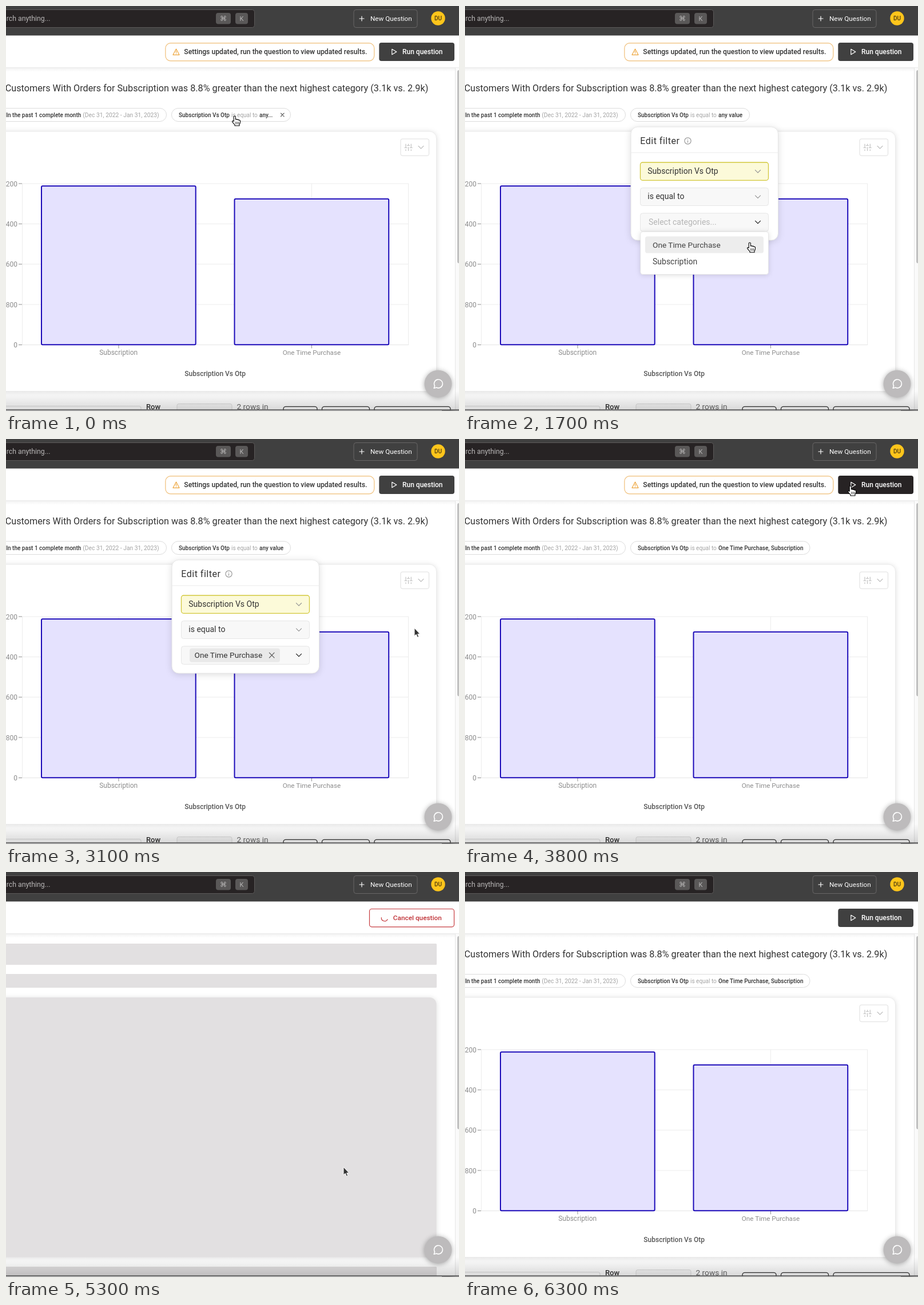
These frames come from a looping animation (792x707 px, 6.79 s). An HTML page:

```html
<!DOCTYPE html>
<html lang="en">
<head>
<meta charset="utf-8">
<title>Edit filter</title>
<style>
html, body { margin: 0; width: 100%; height: 100%; overflow: hidden; background: #fff; }
svg { display: block; width: 792px; height: 707px; font: 12px Roboto, "Open Sans", sans-serif; fill: #333; }
text { white-space: pre; }
.m { font-weight: 500; }
.mid { text-anchor: middle; }
.end { text-anchor: end; }
.dim { fill: #a3a3a3; }
.axis { fill: #8c8c8c; }
.white { fill: #fff; }
.line { fill: none; stroke-width: 1.2; stroke-linecap: round; stroke-linejoin: round; }
.pill { fill: #fff; stroke: #dcdcdc; }
.field { fill: #f8f8f8; stroke: #e6e6e6; }
.bar { fill: #e5e2fe; stroke: #1c0bb9; stroke-width: 2; }
.skeleton { fill: #e2e0e1; }
.shadow { filter: drop-shadow(0 1px 4px #0002); }
.s10 { font-size: 10px; }
.s14 { font-size: 14px; }
.s137 { font-size: 13.7px; }
</style>
</head>
<body>
<svg viewBox="0 0 792 707">
  <defs>
    <linearGradient id="fade" x2="0" y2="1">
      <stop offset="0" stop-color="#000" stop-opacity="0"/>
      <stop offset="1" stop-color="#000" stop-opacity=".15"/>
    </linearGradient>
    <linearGradient id="under" x2="0" y2="1">
      <stop offset="0" stop-color="#f3f3f3"/>
      <stop offset="1" stop-color="#fff"/>
    </linearGradient>
    <path id="chevron" class="line" d="M-4.5 -2.2L0 2.3L4.5 -2.2"/>
    <path id="cross" class="line" d="M-1 -1L1 1M1 -1L-1 1" vector-effect="non-scaling-stroke"/>
  </defs>
  <rect width="792" height="707" fill="#fff"/>
  <rect y="108" width="785" height="7" fill="url(#under)"/>

  <!-- header -->
  <rect width="792" height="51.5" fill="#404040"/>
  <rect x="-20" y="6.5" width="454.5" height="31" rx="4" fill="#272324" stroke="#5c5a5a"/>
  <text x="77.5" y="26" class="end" font-size="12.3" fill="#b9b7b7">Search anything...</text>
  <rect x="367" y="12" width="26" height="19.5" rx="4" fill="#5a5858"/>
  <rect x="401" y="12" width="22" height="19.5" rx="4" fill="#5a5858"/>
  <text x="380" y="26" class="mid" fill="#b9b7b7" style="font-family:Roboto,'DejaVu Sans',sans-serif">⌘</text>
  <text x="412" y="25.5" class="mid" font-size="11" fill="#b9b7b7">K</text>
  <rect x="608" y="6.5" width="111" height="31" rx="4" fill="none" stroke="#686666"/>
  <path class="line" stroke="#fff" d="M618 22H626M622 18V26"/>
  <text x="637" y="26" font-size="11.7" class="white">New Question</text>
  <circle cx="755.5" cy="21.5" r="12.2" fill="#fec51b"/>
  <text x="755.5" y="25" class="mid s10 m" fill="#4c3b10">DU</text>

  <!-- toolbar -->
  <path d="M0 107.8H792" stroke="#e3e3e3"/>
  <g id="notice">
    <rect x="278.8" y="64.8" width="365" height="31" rx="9" fill="#fff" stroke="#f2c88c" stroke-width="1.4"/>
    <path class="line" stroke="#eda63f" d="M297.5 75L303 85.3H292ZM297.5 78.8V81.6M297.5 83.4V83.5"/>
    <text x="311.3" y="84.3" font-size="12.2" class="m">Settings updated, run the question to view updated results.</text>
  </g>
  <g id="run">
    <rect id="runBox" x="652.3" y="64" width="131.7" height="32" rx="4"/>
    <path class="line" stroke="#fff" d="M674.8 75.3L682.8 80L674.8 84.8Z"/>
    <text x="693" y="84.3" class="white m">Run question</text>
  </g>
  <g id="cancel">
    <rect x="635.5" y="64.5" width="148" height="31.3" rx="4" fill="#fff" stroke="#c63b3f" stroke-width="1.2"/>
    <path id="spinner" class="line" stroke="#c63b3f" d="M656.3 79.5A5.7 5.7 0 0 0 667 82.7"/>
    <text x="676.8" y="84.3" class="m" font-size="11.8" fill="#bf3035">Cancel question</text>
  </g>

  <!-- results -->
  <g id="results">
    <text x="738.3" y="149.3" class="end" font-size="16.2">Customers With Orders for Subscription was 8.8% greater than the next highest category (3.1k vs. 2.9k)</text>
    <rect class="pill" x="-30" y="178.5" width="310.5" height="23" rx="11.5"/>
    <text x="131.3" y="193.7" class="end s10 m">In the past 1 complete month</text>
    <text x="134.3" y="193.7" class="dim" font-size="10.3">(Dec 31, 2022 - Jan 31, 2023)</text>
    <rect id="pill" class="pill" x="289.5" y="178.5" height="23" rx="11.5"/>
    <text x="302" y="193.7" class="s10 m">Subscription Vs Otp</text>
    <text x="394" y="193.7" class="s10 dim">is equal to</text>
    <text id="pillValue" x="443" y="193.7" class="s10 m"></text>
    <use id="pillCross" href="#cross" transform="translate(483.3 190) scale(2.8)" stroke="#555"/>

    <rect class="shadow" x="-30" y="219" width="782.5" height="453.5" rx="12" fill="#fff" stroke="#ebebeb"/>
    <rect x="690" y="232" width="49.5" height="29.3" rx="3" fill="#fff" stroke="#dedede"/>
    <path class="line" stroke="#c2c2c2" d="M699 241V247M699 250.5V252.5M697 247.5H701M703.5 241V243M703.5 246.5V252.5M701.5 243.5H705.5M708.3 241V247M708.3 250.5V252.5M706.3 247.5H710.3"/>
    <use href="#chevron" x="725.5" y="246.5" stroke="#bbb"/>

    <path stroke="#ececec" fill="none" d="M28.5 310V591.5M197 310V591M534.5 310V591M703.5 310V591.5M28 310H704M28 380.3H704M28 450.7H704M28 521H704"/>
    <rect id="band" x="366" y="309.7" width="338" height="282" fill="#f3f3f3"/>
    <path stroke="#e6e6e6" d="M28 591.5H704"/>
    <path stroke="#8c8c8c" d="M22 310H28M22 380.3H28M22 450.7H28M22 521H28M22 591.5H28M197 592V597.5M534.5 592V597.5"/>
    <g class="axis end">
      <text x="20" y="314.5">3200</text><text x="20" y="384.8">2400</text><text x="20" y="455.2">1600</text>
      <text x="20" y="525.5">800</text><text x="20" y="596">0</text>
    </g>
    <rect class="bar" x="62" y="314.3" width="269.7" height="277" rx="2"/>
    <rect class="bar" x="399.5" y="336.8" width="269.7" height="254.5" rx="2"/>
    <text x="196.7" y="608.6" class="axis mid">Subscription</text>
    <text x="534.5" y="608.6" class="axis mid" font-size="11.7">One Time Purchase</text>
    <text x="365.7" y="645.8" class="mid m" fill="#555">Subscription Vs Otp</text>

    <rect x="-10" y="698.5" width="246" height="12" rx="3" fill="#fff" stroke="#ddd"/>
    <text x="245" y="704.3" class="m" font-size="13">Row</text>
    <rect x="299" y="694.5" width="96" height="14" rx="3" fill="#f8f8f8" stroke="#ddd"/>
    <text x="403.5" y="704.3" font-size="13.7" fill="#666">2 rows in</text>
    <g fill="#fff" stroke="#333" stroke-width="1.3">
      <rect x="485" y="699.3" width="59" height="14" rx="4"/>
      <rect x="552.5" y="699.3" width="83" height="14" rx="4"/>
      <rect x="644" y="699.3" width="133" height="14" rx="4"/>
    </g>
  </g>

  <g id="loading" class="skeleton">
    <rect x="-10" y="125" width="763" height="37" rx="1.5"/>
    <rect x="-10" y="178" width="763" height="24" rx="1.5"/>
    <rect x="-30" y="219" width="782.5" height="453.5" rx="12" class="shadow"/>
    <rect x="-10" y="689" width="763" height="30" rx="1.5"/>
  </g>

  <!-- window edges -->
  <rect x="785" y="108" width="7" height="597" fill="#fafafa"/>
  <path d="M785.5 108V705" stroke="#e6e6e6"/>
  <rect x="789" y="112" width="8" height="337" rx="3" fill="#c1c1c1"/>
  <rect y="672" width="792" height="33" fill="url(#fade)"/>
  <rect y="704.3" width="792" height="1.5" fill="#3c3c3c"/>
  <rect y="705.8" width="792" height="1.2" fill="#c9c9c9"/>
  <path d="M762 704.5Q777 707 792 706.5V707H762Z" fill="#777"/>

  <g id="tooltip">
    <rect class="shadow" x=".5" y=".5" width="185.5" height="111.5" rx="3" fill="#fff" stroke="#e4e4e4"/>
    <path d="M1 41.5H186" stroke="#e8e8e8"/>
    <text x="17" y="27" class="s137">One Time Purchase</text>
    <text x="17" y="69.3" class="dim" font-size="9.85">Number Of Customers With Orders</text>
    <text x="17" y="90.8" font-size="12.5">2,893</text>
  </g>

  <g id="popup">
    <rect x="290" y="211" width="257.5" height="198" rx="12" fill="#fff" stroke="#e4e4e4" style="filter:drop-shadow(0 2px 6px #0002)"/>
    <text x="306.3" y="240.7" font-size="16" letter-spacing=".5">Edit filter</text>
    <g class="line" stroke="#999"><circle cx="389.5" cy="235.5" r="5.6"/><path d="M389.5 235V238.2M389.5 232.8V232.9"/></g>
    <path d="M290 256H547.5" stroke="#ebebeb"/>
    <rect x="306.5" y="273" width="224" height="31.3" rx="4" fill="#fcfad9" stroke="#d2c83c" stroke-width="1.3"/>
    <rect class="field" x="306.5" y="317.5" width="224" height="31" rx="4"/>
    <rect class="field" x="306.5" y="361.8" width="224" height="31.5" rx="4"/>
    <text x="319.3" y="293.4" class="s14">Subscription Vs Otp</text>
    <text x="319.3" y="337.4" class="s14">is equal to</text>
    <text id="hint" x="321" y="382" class="s14" fill="#b5b5b5">Select categories...</text>
    <g stroke-width="1.5"><use href="#chevron" x="512" y="288.7" stroke="#999" /><use href="#chevron" x="512" y="333" stroke="#999"/></g>
    <use href="#chevron" x="512" y="377.3" stroke="#222" style="stroke-width:1.7"/>
    <g id="chip">
      <rect x="321" y="365.5" width="158" height="24" rx="4" fill="#e9e9e9"/>
      <text x="329.5" y="382.2" class="s137">One Time Purchase</text>
      <use href="#cross" transform="translate(464.7 377.5) scale(4.3)" stroke="#555"/>
    </g>
    <path id="caret" d="M482 370V385" stroke="#222" stroke-width="1.2"/>
    <g id="menu">
      <rect x="306.8" y="394" width="223.7" height="74.5" rx="4" fill="#fff" stroke="#e6e6e6" class="shadow"/>
      <rect id="row0" x="315" y="402.3" width="207" height="29.3" rx="4"/>
      <rect id="row1" x="315" y="431.8" width="207" height="28.4" rx="4"/>
      <text id="label0" x="328" y="422" class="s137">One Time Purchase</text>
      <text id="label1" x="328" y="451" class="s14">Subscription</text>
    </g>
  </g>

  <!-- chat button -->
  <circle cx="755.5" cy="659.7" r="24" fill="#bdbbbc" style="filter:drop-shadow(0 1px 4px #0005)"/>
  <path class="line" stroke="#fff" style="stroke-width:1.6" d="M748.2 667.3L749.6 663.2A7.4 7.4 0 1 1 752.6 666Z"/>

  <g id="cursor">
    <g id="hand" stroke="#000" stroke-width="1.1" stroke-linejoin="round" stroke-linecap="round">
      <path fill="#fff" d="M-1.8 1.6a1.6 1.6 0 0 1 3.2 0V6Q3 5 4.2 6.4Q6 5.6 6.8 7.2Q9.6 6.6 9.6 9.4Q9.6 12.5 8 14.5V17H0V15.4L-3.8 11.2Q-5 9.2 -3.6 8.6Q-2.6 8.3 -1.8 9.4Z"/>
      <path d="M1.8 10.5V14M4.2 10.5V14M6.6 10.5V14" stroke-width=".8"/>
    </g>
    <path id="arrow" d="M0 0V14l3.2-2.9 2.2 5.1 2.3-1-2.1-4.8H9.8Z" stroke="#fff"/>
  </g>
</svg>
<script>
const LOOP = 6790, STEP = 100;
const el = {};
document.querySelectorAll("[id]").forEach(e => el[e.id] = e);

// time, x, y, pointer kind until the next key
const cursorKeys = [
  [0, 400, 192, "hand"], [300, 400, 192, "hand"], [700, 506, 368, "hand"], [1000, 506, 368, "hand"],
  [1500, 498, 413, "hand"], [2100, 498, 413, "hand"], [2600, 491, 448, "hand"], [2800, 491, 448, "hand"],
  [2900, 560, 400, "arrow"], [3100, 714, 330, "arrow"], [3300, 714, 330, "arrow"], [3700, 677, 88, "hand"],
  [3800, 674, 82, "hand"], [4200, 674, 82, "hand"], [4300, 666, 130, "arrow"], [4600, 628, 370, "arrow"],
  [5000, 608, 443, "arrow"], [5300, 590, 515, "arrow"], [5600, 598, 539, "arrow"], [5900, 619, 562, "arrow"]
];
const tipKeys = [[5500, 268, 355], [5600, 324, 404], [5700, 338, 427], [5900, 347, 444]];

function along(keys, t) {
  const i = keys.findLastIndex(k => k[0] <= t);
  const a = keys[Math.max(i, 0)], b = keys[i + 1] || a;
  const p = b === a ? 0 : Math.max(0, (t - a[0]) / (b[0] - a[0]));
  return [a[1] + (b[1] - a[1]) * p, a[2] + (b[2] - a[2]) * p, a[3]];
}
const show = (name, on) => el[name].style.display = on ? "" : "none";
const place = (name, [x, y]) => el[name].setAttribute("transform", `translate(${x} ${y})`);

function draw(t) {
  const during = (a, b) => t >= a && t < b;
  const pos = along(cursorKeys, t);
  const loading = during(4000, 5400), popup = during(300, 3300);
  const picked = t >= 1800, edited = t >= 3300, hovered = t < 400;

  place("cursor", pos);
  show("cursor", t < 6300);
  show("hand", pos[2] === "hand");
  show("arrow", pos[2] === "arrow");

  show("notice", t < 4000);
  show("run", !loading);
  show("cancel", loading);
  show("results", !loading);
  show("loading", loading);
  el.runBox.setAttribute("fill", during(3700, 4000) ? "#272324" : "#404040");
  el.spinner.setAttribute("transform", `rotate(${(t - 5300) * .36} 662 80)`);

  el.pill.setAttribute("width", edited ? 313.5 : 208);
  el.pillValue.textContent = edited ? "One Time Purchase, Subscription" : hovered ? "any..." : "any value";
  show("pillCross", hovered);

  show("popup", popup);
  show("menu", during(1000, 3000));
  show("hint", !picked);
  show("chip", picked);
  show("caret", picked && t < 3000 && Math.floor(t / 500) % 2);
  [picked, t >= 2800].forEach((chosen, i) => {
    const top = 402 + 29.5 * i, hover = pos[1] >= top && pos[1] < top + 29.5;
    el["row" + i].setAttribute("fill", chosen ? "#6f6e6e" : hover ? "#ededed" : "#fff");
    el["label" + i].setAttribute("fill", chosen ? "#dedede" : "#444");
  });

  show("band", during(5500, 6300));
  show("tooltip", during(5500, 6300));
  place("tooltip", along(tipKeys, t));
}

const start = performance.now();
function tick() {
  const t = (performance.now() - start) % LOOP;
  draw(Math.floor(t / STEP) * STEP);
  requestAnimationFrame(tick);
}
tick();
</script>
</body>
</html>
```
